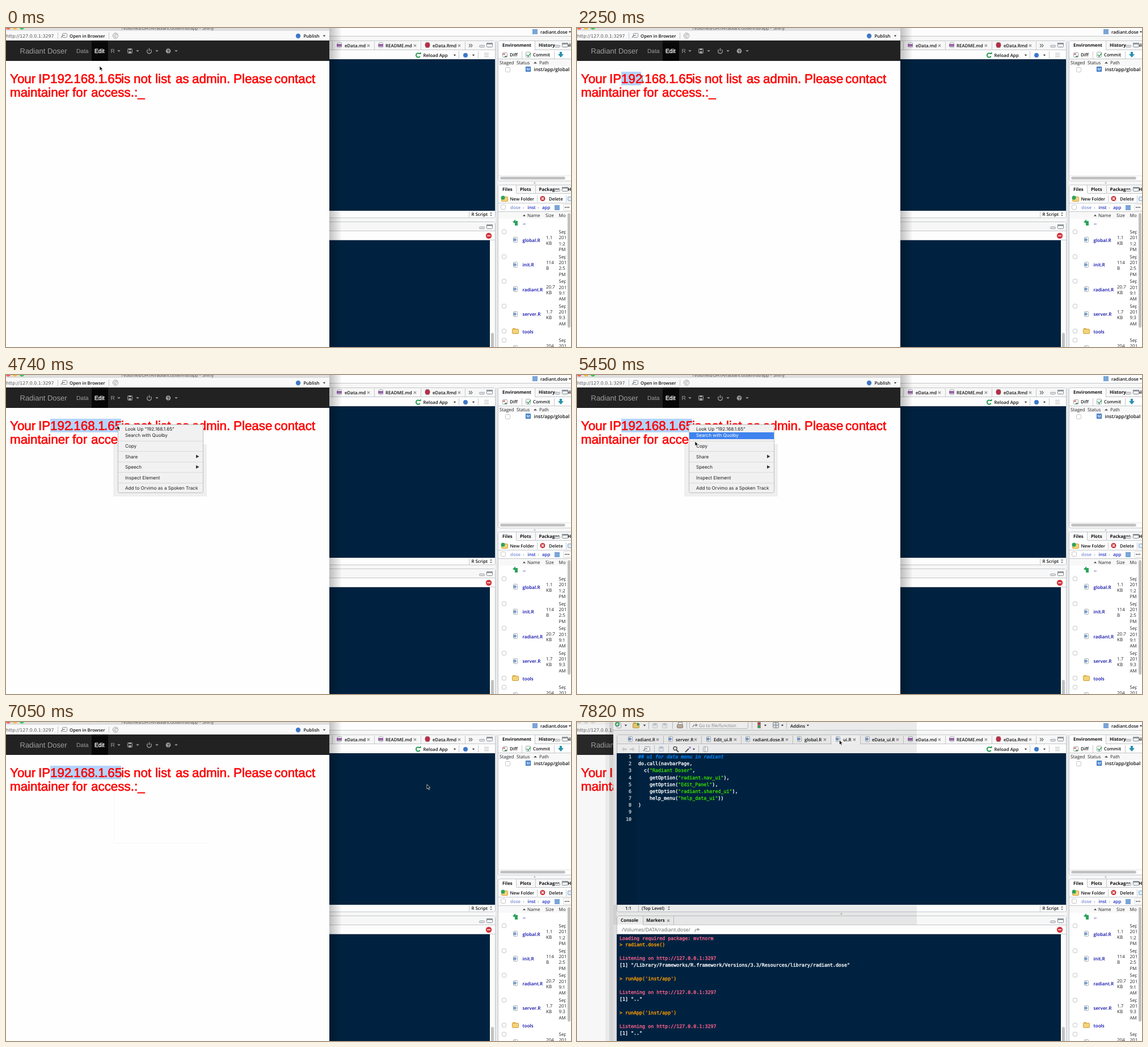
Write an HTML page with a canvas that moves like this. It is 996x562 px and loops after 7990 ms.

```html
<!DOCTYPE html>
<html lang="en">
<head>
<meta charset="utf-8">
<title>App access check</title>
<style>
html, body { margin: 0; width: 100%; height: 100%; overflow: hidden; background: #fff; }
canvas { display: block; }
</style>
</head>
<body>
<canvas id="stage" width="996" height="562"></canvas>
<script>
const c = document.getElementById('stage').getContext('2d');
c.textRendering = 'geometricPrecision';

const LOOP = 7990, SWAP = 7230;
const NAVY = '#002240', LINE = '#c3c7cb', BLUE = '#3f78c9';
const ui = (size = 7.9, weight = 600) => `${weight} ${size}px "Open Sans", sans-serif`;
const arial = size => `${size}px "Liberation Sans", Arial, sans-serif`;
const inter = size => `${size}px Inter, sans-serif`;
const mono = (style = '') => `${style} 8.33px "DejaVu Sans Mono", monospace`;

function rect(x, y, w, h, color) {
  c.fillStyle = color;
  c.fillRect(x, y, w, h);
}
function text(s, x, y, color = '#111', font = ui(), stroke = 0) {
  c.font = font;
  c.fillStyle = color;
  c.fillText(s, x, y);
  if (!stroke) return;
  c.strokeStyle = color;
  c.lineWidth = stroke;
  c.strokeText(s, x, y);
}
const codeText = (s, x, y, color, style) => text(s, x, y, color, mono(style), .35);
function poly(color, ...pts) {
  c.beginPath();
  for (let i = 0; i < pts.length; i += 2) c.lineTo(pts[i], pts[i + 1]);
  c.closePath();
  c.fillStyle = color;
  c.fill();
}
function line(color, width, ...pts) {
  c.beginPath();
  for (let i = 0; i < pts.length; i += 2) c.lineTo(pts[i], pts[i + 1]);
  c.strokeStyle = color;
  c.lineWidth = width;
  c.stroke();
}
function dot(x, y, r, color) {
  c.beginPath();
  c.arc(x, y, r, 0, 7);
  c.fillStyle = color;
  c.fill();
}
function ring(x, y, r, color, from = 0, to = 6.29, width = 1) {
  c.beginPath();
  c.arc(x, y, r, from, to);
  c.strokeStyle = color;
  c.lineWidth = width;
  c.stroke();
}
function box(x, y, w, h, r, fill, stroke) {
  c.beginPath();
  c.roundRect(x + .5, y + .5, w - 1, h - 1, r);
  c.fillStyle = fill;
  c.fill();
  c.strokeStyle = stroke;
  c.lineWidth = 1;
  c.stroke();
}
const hline = (x, y, w, color = LINE) => rect(x, y, w, 1, color);
const vline = (x, y, h, color = LINE) => rect(x, y, 1, h, color);
const caret = (x, y, color = '#333', r = 2.2) => poly(color, x - r, y - 1.2, x + r, y - 1.2, x, y + 1.6);
const checkbox = (x, y, s = 8) => box(x, y, s, s, 2, '#fff', '#c2c2c2');
const close = (x, y) => {
  line('#999', 1.4, x - 2, y - 2, x + 2, y + 2);
  line('#999', 1.4, x + 2, y - 2, x - 2, y + 2);
};
function paneButtons(x, y) {
  box(x, y + 4, 10, 4, 1, '#eee', '#8d959c');
  box(x + 13, y, 11, 8, 1, '#fff', '#7d858c');
  rect(x + 13, y, 11, 3, '#8d959c');
}
function page(x, y, mark = '#7d9fcb') {
  box(x + 1, y, 8, 10, 1, '#fff', '#a3acb5');
  dot(x + 4, y + 5, 2.8, mark);
}
function floppy(x, y, color) {
  box(x, y, 9, 9, 1, '#f4f6f8', color);
  rect(x + 2, y + 1, 5, 3, color);
}
function upDown(x, y) {
  poly('#777', x - 2, y - 1, x + 2, y - 1, x, y - 3.5);
  poly('#777', x - 2, y + 1, x + 2, y + 1, x, y + 3.5);
}
function folder(x, y) {
  rect(x + 1, y, 5, 3, '#d9a93c');
  box(x, y + 1, 12, 9, 1.5, '#f3d37b', '#cf9f37');
}

function mainToolbar() {
  rect(64, 0, 932, 14, '#fdfdfd');
  page(69, 1, '#fff');
  dot(71, 4, 4, '#2da35e');
  line('#fff', 1.4, 68.5, 4, 73.5, 4);
  line('#fff', 1.4, 71, 1.5, 71, 6.5);
  caret(86, 6);
  folder(98, 1);
  poly('#2da35e', 106, 1, 111, 4, 106, 7);
  caret(119, 6);
  vline(126, 0, 12);
  floppy(133, 2, '#c9cfd6');
  floppy(150, 2, '#c9cfd6');
  vline(168, 0, 12);
  box(178, 0, 8, 6, 0, '#fff', '#999');
  box(176, 4, 11, 7, 1.5, '#c8b6a6', '#8d8178');
  vline(193, 0, 12);
  box(198, -4, 104, 16, 2, '#fff', '#c3c3c3');
  line('#999', 1.5, 204, 9, 206, 5.5, 210, 5.5);
  poly('#999', 209, 2.5, 213, 5.5, 209, 8.5);
  text('Go to file/function', 215, 9, '#8a8a8a', ui(7.8, 400));
  vline(308, 0, 12);
  rect(318, 0, 6, 11, '#999');
  dot(321, 3, 2, '#d33');
  dot(321, 8, 2, '#3a4');
  caret(332, 6);
  box(345, 0, 11, 11, 1, '#e4e8ec', '#8f979e');
  vline(350, 0, 11, '#8f979e');
  hline(345, 5, 11, '#8f979e');
  caret(362, 6);
  vline(369, 0, 12);
  text('Addins', 376, 9.5);
  caret(407, 6);
  rect(928, 2, 9, 9, '#7ba5d6');
  text('radiant.dose', 942, 10);
  caret(994, 7);
  hline(64, 14, 932);
}

// name, icon x, text x, close x
const tabs = [
  ['radiant.R', 89, 103, 142], ['server.R', 160, 174, 209], ['Edit_ui.R', 227, 241, 279],
  ['radiant.dose.R', 296, 310, 370], ['global.R', 387, 401, 437], ['ui.R', 455, 469, 489],
  ['eData_ui.R', 507, 520, 565], ['eData.md', 583, 597, 639], ['README.md', 656, 669, 721],
  ['eData.Rmd', 738, 752, 799]
];

function sourcePane(caretOn) {
  box(70, 22, 793, 313, 3, '#fdfdfd', LINE);
  rect(71, 23, 791, 15, '#f7f7f7');
  rect(449, 23, 50, 16, '#fff');
  for (const [name, ix, tx, cx] of tabs) {
    if (name.endsWith('.R')) page(ix, 25);
    else {
      page(ix, 25, '#fff');
      name.endsWith('.md') ? rect(ix, 28, 9, 5, '#9a6aa8') : dot(ix + 5, 30, 4.5, '#b52f45');
    }
    text(name, tx, 33.5);
    close(cx, 31);
    vline(cx + 10, 24, 14);
  }
  hline(71, 38, 378);
  hline(499, 38, 363);
  text('»', 815, 35, '#777', ui(15, 600));
  paneButtons(834, 26);

  poly('#d8d8d8', 79, 48, 83, 44, 83, 46.5, 88, 46.5, 88, 49.5, 83, 49.5, 83, 52);
  poly('#d8d8d8', 102, 48, 98, 44, 98, 46.5, 93, 46.5, 93, 49.5, 98, 49.5, 98, 52);
  vline(109, 41, 13);
  box(119, 43, 10, 9, 1, '#fff', '#9aa3ab');
  line('#9aa3ab', 1.3, 117, 51, 120, 47, 124, 47);
  vline(136, 41, 13);
  floppy(144, 43, '#bdcbd9');
  vline(161, 41, 13);
  ring(173, 46.5, 3, '#555', 0, 6.29, 1.5);
  line('#555', 2, 175, 49, 179, 53);
  line('#555', 2, 191, 53, 197, 47);
  dot(199, 45, 2, '#b99be0');
  caret(206, 48);
  vline(214, 41, 13);
  box(222, 43, 9, 10, 1, '#fff', '#a9b0b6');
  vline(225, 43, 10, '#a9b0b6');
  ring(726.5, 48, 3.6, '#25994f', .5, 5.4, 2);
  poly('#25994f', 727, 46, 731.5, 46, 731.5, 42);
  text('Reload App', 735.5, 51);
  caret(791, 48);
  vline(798, 41, 13);
  dot(810, 48, 4, BLUE);
  caret(824, 48);
  vline(832, 41, 13);
  for (const y of [44, 47, 50]) hline(843, y, 8, '#b7b7b7');

  rect(70, 55, 792, 267, NAVY);
  rect(70, 55, 35, 267, '#001f3a');
  code();
  if (caretOn) vline(108, 55, 12, '#fff');

  text('1:1', 85, 331, '#111', ui(7.8));
  vline(108, 323, 11);
  text('(Top Level)', 114, 331, '#111', ui(7.8));
  upDown(162, 328);
  vline(816, 323, 11);
  text('R Script', 820.5, 331, '#111', ui(7.8));
  upDown(855, 328);
}

function code() {
  const rows = [
    '## ui for data menu in radiant', 'do.call(navbarPage,', '  c("Radiant Doser",',
    '    getOption("radiant.nav_ui"),', '    getOption("Edit_Panel"),',
    '    getOption("radiant.shared_ui"),', '    help_menu("help_data_ui"))', ')', '', ''
  ];
  rows.forEach((row, i) => {
    const y = 64 + i * 12.17;
    c.textAlign = 'right';
    codeText(i + 1, 96, y, '#c4ccd6');
    c.textAlign = 'left';
    let x = 108;
    for (const part of row.split(/("[^"]*")/)) {
      const color = i === 0 ? '#0088ff' : part[0] === '"' ? '#3ad900' : '#fff';
      codeText(part, x, y, color, i === 0 ? 'italic' : '');
      x += c.measureText(part).width;
    }
  });
}

function consolePane() {
  box(70, 341, 793, 226, 3, '#fdfdfd', LINE);
  rect(116, 342, 746, 15, '#f7f7f7');
  hline(116, 357, 746);
  vline(116, 342, 15);
  vline(170, 342, 15);
  text('Console', 77, 352, '#111', ui(7.9, 700));
  text('Markers', 122, 352, '#111', ui(7.9, 700));
  close(161, 350);
  paneButtons(834, 346);
  text('/Volumes/DATA/radiant.dose/', 79, 369, '#666', ui(8.8, 400));
  line('#aaa', 1.5, 208, 370, 209, 365.5, 213, 365.5);
  poly('#aaa', 212, 362.5, 217, 365.5, 212, 368.5);
  dot(851, 366, 5.2, '#d3343d');
  rect(848, 365, 6, 2, '#f3b9bc');
  hline(71, 373, 791);
  rect(70, 374, 783, 188, NAVY);
  rect(853, 374, 9, 188, '#fbfbfb');
  box(855, 537, 5, 30, 2, '#c1c1c1', '#c1c1c1');
  const listen = 'Listening on http://127.0.0.1:3297', run = "> runApp('inst/app')", res = '[1] ".."';
  ['Loading required package: mvtnorm', '> radiant.dose()', '', listen,
    '[1] "/Library/Frameworks/R.framework/Versions/3.3/Resources/library/radiant.dose"',
    '', run, '', listen, res, '', run, '', listen, res
  ].forEach((s, i) => {
    const color = s[0] === '>' ? '#ff9d00' : s[0] === '[' ? '#fff' : '#ff628c';
    codeText(s, 75, 383.5 + i * 11.96, color);
  });
}

function environmentPane() {
  box(867, 22, 140, 248, 3, '#fff', LINE);
  rect(933, 23, 63, 15, '#f7f7f7');
  vline(932, 23, 15);
  hline(932, 38, 64);
  text('Environment', 875, 32.5, '#111', ui(7.9, 700));
  text('History', 939, 32.5, '#111', ui(7.9, 700));
  text('Build', 982, 32.5, '#111', ui(7.9, 700));
  paneButtons(967, 26);
  box(875, 43, 9, 9, 1, '#fff', '#9aa3ab');
  rect(876, 45, 4, 2, '#d66');
  rect(879, 49, 4, 2, '#5a9c5a');
  text('Diff', 888, 50);
  vline(909, 41, 13);
  box(916, 42, 9, 10, 1, '#fff', '#9aa3ab');
  line('#3aa55a', 1.5, 918, 47, 920.5, 50, 925, 44);
  text('Commit', 929, 50);
  vline(966, 41, 13);
  poly('#2b93ae', 976, 42, 980, 42, 980, 46, 983, 46, 978, 52, 973, 46, 976, 46);
  hline(868, 54, 128);
  rect(868, 55, 128, 12, '#f8f8f8');
  text('Staged', 870, 64, '#222', ui(8, 500));
  text('Status', 900, 64, '#222', ui(8, 500));
  poly('#444', 930, 62.5, 936, 62.5, 933, 59.5);
  text('Path', 940, 64, '#222', ui(8, 500));
  checkbox(880, 69, 9);
  rect(916, 68, 9, 9, '#3c79c6');
  text('M', 917.2, 75.3, '#fff', ui(7, 600));
  text('inst/app/global', 930.5, 76, '#111', ui(8.6));
  hline(868, 260, 128, '#e3e3e3');
  box(871, 262, 115, 5, 2, '#c1c1c1', '#c1c1c1');
}

function filesPane() {
  box(867, 276, 140, 300, 3, '#fff', LINE);
  rect(900, 277, 96, 14, '#f7f7f7');
  vline(899, 277, 14);
  vline(933, 277, 14);
  hline(900, 291, 96);
  ['Files', 'Plots', 'Packages', 'Help'].forEach((s, i) =>
    text(s, [875, 906, 939.5, 990][i], 287, '#111', ui(7.9, 700)));
  paneButtons(967, 280);
  folder(873, 296);
  dot(876, 299, 3.5, '#2da35e');
  text('New Folder', 888.5, 304, '#111', ui(7.8));
  vline(936, 295, 12);
  dot(946, 300.5, 4.5, '#c93036');
  line('#fff', 1.4, 944, 298.5, 948, 302.5);
  line('#fff', 1.4, 948, 298.5, 944, 302.5);
  text('Delete', 957, 304);
  vline(987, 295, 12);
  box(990, 297, 10, 8, 1, '#dcebf8', '#6da0d3');
  hline(868, 308, 128);
  checkbox(872, 311, 9);
  text('dose', 889, 319, '#7d8fd8');
  text('inst', 919.5, 319, '#1c2fc0');
  text('app', 945, 319, '#1c2fc0');
  text('›', 911, 319, '#aaa');
  text('›', 937, 319, '#aaa');
  rect(967, 312, 9, 9, '#7ba5d6');
  box(982, 310, 18, 12, 1, '#fafafa', '#ddd');
  for (const x of [986, 989, 992]) dot(x, 316, 1, '#444');
  hline(868, 323, 128);
  rect(868, 324, 122, 12, '#f8f8f8');
  const plain = ui(8, 500);
  poly('#444', 911, 331.5, 916, 331.5, 913.5, 328.5);
  text('Name', 919, 333, '#222', plain);
  text('Size', 951, 333, '#222', plain);
  poly('#2da35e', 893, 342, 898, 337, 898, 340, 902, 340, 902, 348, 897, 348, 897, 344);
  text('..', 911, 346, '#0a0aa8', ui(8.5, 700));

  c.save();
  c.beginPath();
  c.rect(868, 324, 119, 238);
  c.clip();
  text('Modified', 974.5, 333, '#222', plain);
  const files = [
    ['global.R', '1.1', 'KB', '1:2', 'PM'], ['init.R', '114', 'B', '2:5', 'PM'],
    ['radiant.R', '20.7', 'KB', '9:1', 'AM'], ['server.R', '1.7', 'KB', '9:3', 'AM'],
    ['ui.R', '204', 'B', '1:2', 'PM']
  ];
  files.forEach(([name, size, unit, time, half], i) => {
    const y = i < 4 ? 359 + i * 43.6 : 550;
    checkbox(874, Math.round(y - 4));
    page(893, Math.round(y + 9));
    text(name, 910.5, y + 17.5, '#0a0aa8', ui(8.1, 600));
    text(size, 952, y + 13, '#222', plain);
    text(unit, 952, y + 23, '#222', plain);
    ['Sep', '2016', time, half].forEach((s, k) => text(s, 974.5, y + 3 + k * 10.3, '#222', plain));
  });
  checkbox(874, 530);
  folder(892, 529);
  text('tools', 910.5, 537.5, '#0a0aa8', ui(8.1, 600));
  c.restore();
  box(990, 326, 5, 202, 2, '#c1c1c1', '#c1c1c1');
}

function ide(front, caretOn) {
  rect(64, 0, 932, 562, '#f7f7f7');
  rect(863, 22, 4, 540, '#e6e8ea');
  mainToolbar();
  sourcePane(caretOn);
  consolePane();
  environmentPane();
  filesPane();
  dot(466, 338, 1.5, '#bbb');
  dot(932, 273, 1.5, '#bbb');
  if (front) {
    rect(64, 0, 535, 55, 'rgba(0,0,0,.07)');
    rect(64, 322, 535, 35, 'rgba(0,0,0,.07)');
    rect(64, 55, 6, 507, 'rgba(0,0,0,.1)');
  }
}

// Left edge of each address character, used to snap the selection.
const edges = [78, 89.7, 101.4, 113, 119, 131, 143.5, 156, 162, 174, 180, 191, 203];

function message(selEnd) {
  if (selEnd > 78) rect(78, 77, selEnd - 78, 24, '#b3d4fd');
  const words = [['Your', 7], ['IP', 57], ['192', 78], ['.168', 113], ['.1', 156], ['.65', 173],
    ['is', 203], ['not', 225], ['list', 263], ['as', 299], ['admin.', 328], ['Please', 401],
    ['contact', 473], ['maintainer', 7, 1], ['for', 117, 1], ['access.:_', 150, 1]];
  for (const [s, x, row = 0] of words) text(s, x, 97 + row * 23.5, '#f00', arial(22.4), .6);
}

function appWindow(active, selEnd) {
  rect(0, 0, 570, 562, '#fefefe');
  rect(0, 0, 570, 5, active ? '#dedede' : '#f2f2f2');
  const lights = active ? ['#f9605a', '#f8bc34', '#36c84b'] : Array(3).fill('#d5d5d5');
  lights.forEach((color, i) => dot(4 + i * 12, -1, 3.8, color));
  c.textAlign = 'center';
  text('/Volumes/DATA/radiant.dose/inst/app - Shiny', 285, 2.5, '#555', arial(8.2));
  c.textAlign = 'left';
  rect(0, 5, 570, 17, '#f9f9f9');
  text('http://127.0.0.1:3297', 0, 16.5, '#555', '7.9px "DejaVu Sans", sans-serif');
  vline(91, 8, 11);
  box(99, 9, 9, 8, 1, '#fff', '#858d95');
  line('#858d95', 1.3, 97, 17, 100, 13, 104, 13);
  text('Open in Browser', 112, 17, '#111', ui(7.8));
  vline(181, 8, 11);
  ring(193, 13.5, 4.6, '#999');
  ring(193, 13.5, 2.2, '#999', .6, 5.2);
  line('#999', 1, 193, 13.5, 197, 10);
  dot(515, 14, 4.2, BLUE);
  text('Publish', 524.5, 17);
  caret(561, 14);

  rect(0, 22, 570, 36, '#222');
  rect(151, 22, 29, 36, '#080808');
  const gray = '#9d9d9d';
  text('Radiant Doser', 24.5, 45, gray, arial(13));
  text('Data', 124, 44, gray, arial(10.2));
  text('Edit', 156, 44, '#fff', arial(10.2), .3);
  text('R', 184.5, 44, gray, arial(10.2));
  for (const x of [199, 232, 266, 300]) caret(x, 40.5, gray, 2.8);
  box(214, 36, 9, 9, 1, '#222', gray);
  rect(216, 36, 5, 3, gray);
  rect(216, 41, 5, 3, gray);
  ring(252.5, 41, 3.8, gray, -.9, 4.05, 1.4);
  line(gray, 1.4, 252.5, 35.5, 252.5, 40.5);
  dot(286, 40.5, 4.3, gray);
  text('?', 283.7, 43.6, '#222', '700 8px "Liberation Sans", sans-serif');
  message(selEnd);
}

function menu(y) {
  rect(189, 122, 165, 92, 'rgba(0,0,0,.06)');
  box(197, 87, 151, 121, 3, '#f1f1f1', '#bdbdbd');
  const pick = y > 118 ? 2 : y >= 101 ? 1 : 0;
  if (pick) rect(198, pick === 1 ? 101 : 119, 149, 12, '#3f83ee');
  ['Look Up “192.168.1.65”', 'Search with Quolby', 'Copy', 'Share', 'Speech',
    'Inspect Element', 'Add to Orvimo as a Spoken Track'].forEach((s, i) => {
    const base = i < 2 ? 98 + i * 11.3 : 128 + (i - 2) * 18.5;
    text(s, 210, base, pick && pick === i ? '#fff' : '#222', inter(8.15));
    if (i > 1) hline(198, Math.round(base - 12.5), 149, '#d9d9d9');
    if (i === 3 || i === 4) poly('#333', 335, base - 6, 340.5, base - 3, 335, base);
  });
}

// start, end, steps, x, y, easing power
const moves = [
  [170, 170, 1, 152, 79, 1], [470, 1180, 5, 80.5, 87.5, 1], [1720, 2600, 6, 168, 91, 2.3],
  [2780, 3670, 6, 200, 91, .8], [4380, 4740, 3, 196, 89, 1], [5100, 5800, 5, 210, 121.6, .3],
  [6340, 7050, 5, 742, 110, .7], [7400, 7820, 3, 462.5, 32, .8]
];
function pointer(t) {
  let x = 165, y = 67;
  for (const [start, end, n, tx, ty, power] of moves) {
    if (t < start) break;
    const gap = (end - start) / (n - 1) || 1;
    const k = Math.min(n, Math.floor((t - start) / gap + 1e-6) + 1);
    const p = (k / n) ** power;
    x += (tx - x) * p;
    y += (ty - y) * p;
  }
  return [x, y];
}
function drawPointer(x, y, beam) {
  c.save();
  c.translate(x, y);
  if (beam) {
    line('#333', 1, 0, -4.5, 0, 4.5);
    line('#333', 1, -2, -5, 0, -4, 2, -5);
    line('#333', 1, -2, 5, 0, 4, 2, 5);
  } else {
    poly('#000', 0, 0, 0, 8, 2, 6.3, 3.3, 9.3, 4.7, 8.7, 3.4, 5.8, 5.8, 5.6);
    c.strokeStyle = '#fff';
    c.lineWidth = .7;
    c.stroke();
  }
  c.restore();
}

function draw(t) {
  const [x, y] = pointer(t);
  const selEnd = t < 1720 ? 0 : t >= 3670 ? 203 : edges.filter(e => e <= x + 3).pop();
  if (t < SWAP) {
    ide(false, false);
    const shade = c.createLinearGradient(570, 0, 592, 0);
    shade.addColorStop(0, 'rgba(0,0,0,.24)');
    shade.addColorStop(1, 'rgba(0,0,0,0)');
    rect(570, 0, 22, 562, shade);
    appWindow(true, selEnd);
    if (t >= 4380 && t < 6340) menu(y);
    if (t >= 6340) {
      vline(190, 122, 92, '#f6f6f6');
      hline(190, 213, 164, '#f6f6f6');
    }
  } else {
    appWindow(false, 0);
    rect(0, 0, 64, 562, 'rgba(128,128,128,.06)');
    rect(50, 0, 7, 562, 'rgba(0,0,0,.05)');
    rect(57, 0, 7, 562, 'rgba(0,0,0,.13)');
    ide(true, t < 7575);
  }
  drawPointer(x, y, t >= 170 && t < 4380);
}

function tick() {
  draw(performance.now() % LOOP);
  requestAnimationFrame(tick);
}
tick();
</script>
</body>
</html>
```
